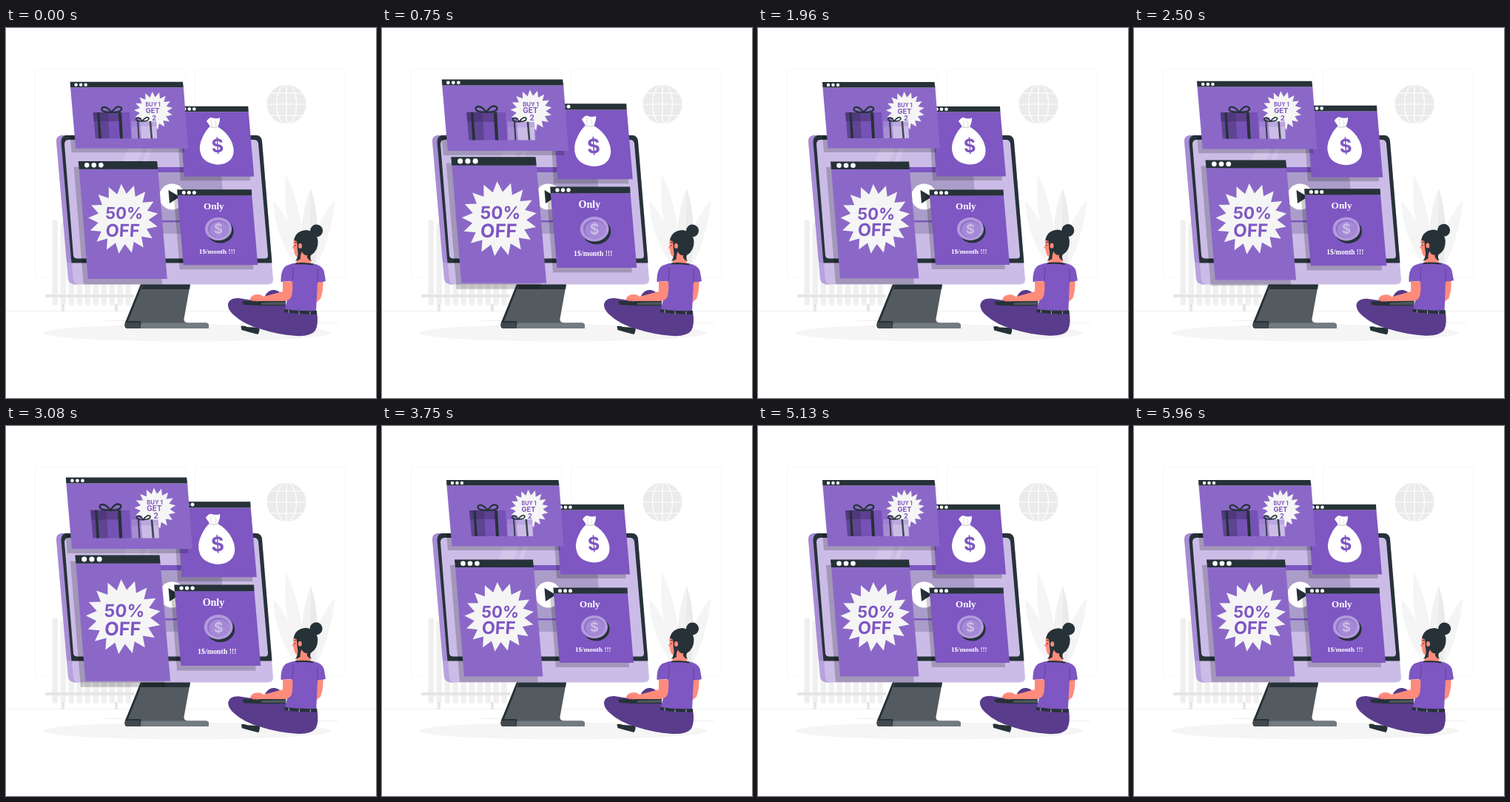
An HTML page that plays this animation: 500 px wide and 500 px high, repeating every 6000 ms.

```html
<!DOCTYPE html>
<html lang="en">
<head>
<meta charset="utf-8">
<title>Offers on screen</title>
<style>
  html, body { margin: 0; width: 100%; height: 100%; overflow: hidden; background: #fff; }
  svg { display: block; width: 100vw; height: 100vh; }
  text { text-anchor: middle; font-weight: 700; font-family: Inter, Roboto, sans-serif; }
  .serif text { font-family: "Liberation Serif", "Noto Serif", serif; }
  .serif .coin { font-family: Inter, Roboto, sans-serif; }
  .dark { fill: #263238; }
  .main { fill: #7e57c2; }
  .soft { fill: #8b68c8; }
  .pale { fill: #cbbce7; }
  .skin { fill: #ff8b7b; }
  .shade { fill: #000; opacity: .2; }
  .line { fill: none; stroke: #263238; stroke-width: 2.2; }
  .thin { stroke-width: 1.6; }
  #top { transform-origin: 166.5px 118px; }
  #bag { transform-origin: 286px 153px; }
  #sale { transform-origin: 158px 259px; }
  #coin { transform-origin: 285.5px 269px; }
  #woman { transform-origin: 366px 340px; }
</style>
</head>
<body>
<svg viewBox="0 0 500 500">
  <!-- Room -->
  <g fill="none" stroke="#f8f8f8">
    <path d="M39.500 55.500H242.500V337.500H39.500ZM255.500 55.500H458.500V337.500H255.500Z"/>
    <path d="M0 382.500H500M134 395.500H168M380 398.500H449" stroke="#f0f0f0"/>
  </g>
  <circle cx="379" cy="103" r="26.500" fill="#ebebeb"/>
  <g fill="none" stroke="#fff" stroke-width="1.200">
    <ellipse cx="379" cy="103" rx="13.500" ry="26.500"/>
    <path d="M379 76V130M352 103H406M357 88H401M357 118H401"/>
  </g>
  <g fill="#f5f5f5">
    <path d="M399 318Q372 262 378 198Q399 235 405 318Z"/>
    <path d="M397 318Q386 258 361 234Q364 285 392 320Z"/>
    <path d="M412 318Q414 266 445 232Q437 290 420 320Z"/>
    <path d="M400 318Q396 255 412 217Q426 258 418 318Z" fill="#ebebeb"/>
    <path d="M400 318Q396 255 412 217Q412 265 408 318Z" fill="#f2f2f2"/>
  </g>
  <g fill="#f0f0f0">
    <g id="fins"></g>
    <path d="M53 360H173V364H53ZM75 373H79V383H75ZM147 373H151V383H147Z" fill="#e6e6e6"/>
  </g>
  <ellipse cx="245" cy="412" rx="194" ry="11.500" fill="#f5f5f5"/>

  <!-- Monitor -->
  <path d="M185 346H249L240.500 393Q240 398 246 398.500H271Q274 399 274 402V406H164Q159 405 161 398Z" fill="#535b60"/>
  <path d="M185 346H249L248 353H183ZM185 346L165 396H182V406H164Q159 405 161 398L182 346Z" class="dark"/>
  <path d="M185 398.500H270Q274 399 274 402V406H182V400Z" fill="#727b7f"/>
  <path d="M161 398H180L182 406H164Q160 405 161 398Z" fill="#40494e"/>
  <path d="M75 145H338Q345 145 346 153L361 340Q361 346.500 354 346.500H93Q85 346 84 339L68 153Q68 146 75 145Z" class="pale"/>
  <path d="M75 145H82L89 317H82L68 153Q68 146 75 145Z" fill="#a78cd5"/>
  <path d="M82 317H89L91 340Q92 346 97 346.500H93Q85 346 84 339Z" fill="#b7a2df"/>
  <path d="M81 145H338Q345 145 346 153L359.500 317.500H88.500L74.500 154Q74.500 146 81 145Z" class="dark"/>
  <path d="M85 151H335Q340 151 341 156L354 307Q354 311.500 350 311.500H96Q91 311 91 307L79 157Q79 151 85 151Z" class="pale"/>
  <path d="M170 151H190L175 187H155ZM196 151H202L188 187H182Z" fill="#fff" opacity=".15"/>
  <path d="M120 188H290L298 278H128Z" fill="#ab9dc9"/>
  <path d="M120 188H240V195H121ZM126 260H290V262.500H126Z" class="main"/>
  <circle cx="224.500" cy="228" r="17.500" fill="#fff"/>
  <path d="M219.500 219L235 228L221 237Z" class="dark"/>

  <g id="bag" class="pop">
    <path d="M231 120H323L330 206H236Z" class="shade"/>
    <path d="M234.500 113.500H327.500L335 200.500H241Z" class="main"/>
    <path d="M234 106H327L327.500 113.500H234.500Z" class="dark"/>
    <g fill="#fff">
      <circle cx="241.500" cy="109.700" r="2.300"/><circle cx="248" cy="109.700" r="2.300"/><circle cx="254.500" cy="109.700" r="2.300"/>
      <path d="M271 126Q276 119 280 122Q285 123 289 121.500Q289 129 286 133.500Q298 140 304 152Q311 167 304 177Q298 184.500 286 184.500Q269 183 264 172Q259 160 266 147Q270 138 276 133Z"/>
    </g>
    <path d="M275 133Q281 136 287 133" fill="none" stroke="#d8d8d8" stroke-width="1.500"/>
    <path d="M278 124Q276 128 279 132M282 125Q285 128 283 132" fill="none" stroke="#ddd"/>
    <text x="286" y="168" font-size="25" class="main" transform="rotate(-4 286 160)">$</text>
  </g>

  <g id="top" class="pop">
    <path d="M87 145H236L241 168H89Z" class="shade"/>
    <path d="M87.500 80.500H239.500L245.700 162.500H94.500Z" class="soft"/>
    <path d="M87 73H238.500L239.500 80.500H87.500Z" class="dark"/>
    <g fill="#fff">
      <circle cx="95" cy="77" r="2.200"/><circle cx="101.500" cy="77" r="2.200"/><circle cx="108" cy="77" r="2.200"/>
    </g>
    <path data-star="199 112 26 18.500 17" fill="#f5f5f5"/>
    <g class="main">
      <text x="198.500" y="106.500" font-size="7.200">BUY 1</text>
      <text x="198" y="115.500" font-size="9.300">GET</text>
      <text x="200" y="124.500" font-size="9.300">2</text>
    </g>
    <path d="M118 114H139L141 149H121Z" fill="#5f4494"/>
    <path d="M138 114H167L169 149H140Z" fill="#7652b6"/>
    <path d="M118 114H156L157 126H119Z" fill="#382657" opacity=".4"/>
    <path d="M123.500 114H126.500L129 149H125.500ZM152 114H156L158 149H154Z" class="dark"/>
    <path d="M143 114Q127 114 130 108Q135 104 143 114Q150 103 156 108Q158 114 143 114" class="line"/>
    <path d="M169 126H182L183 149H170Z" fill="#a88dd6"/>
    <path d="M181 126H203L204 149H183Z" class="pale"/>
    <path d="M168 126H203L204 133H169Z" fill="#7e57c2" opacity=".2"/>
    <path d="M177 126H179L180.500 149H178.500ZM193.500 126H196L198 149H195.500Z" class="dark" opacity=".85"/>
    <path d="M184 126Q174 126 176 122Q180 119 184 126Q190 118 193 122Q193 126 184 126" class="line thin"/>
  </g>

  <g id="sale" class="pop">
    <path d="M92 188H198L211 346H105Z" class="shade"/>
    <path d="M99 191H205L217.500 338.500H111Z" class="soft"/>
    <path d="M98 180.500H204L205 191H99Z" class="dark"/>
    <g fill="#fff">
      <circle cx="109.500" cy="185.700" r="3.300"/><circle cx="119" cy="185.700" r="3.300"/><circle cx="128.500" cy="185.700" r="3.300"/>
    </g>
    <path data-star="158.500 258 47 34 17" fill="#f5f5f5"/>
    <g class="main" transform="translate(159.500 258.500) skewX(-3)">
      <text font-size="22">50%</text>
      <text x="-1" y="23" font-size="23.500">OFF</text>
    </g>
  </g>

  <g id="coin" class="pop serif">
    <path d="M227 226H326L334 326H235Z" class="shade"/>
    <path d="M232 226.500H332L340 320H240Z" class="main"/>
    <path d="M231.500 218.500H331.500L332 226.500H232Z" class="dark"/>
    <g fill="#fff">
      <circle cx="240.500" cy="222.700" r="2.500"/><circle cx="247.500" cy="222.700" r="2.500"/><circle cx="254.500" cy="222.700" r="2.500"/>
      <text x="280.800" y="245" font-size="13">Only</text>
      <text x="285.300" y="305" font-size="9.200">1$/month !!!</text>
    </g>
    <ellipse cx="289.500" cy="274.500" rx="18" ry="16" class="dark"/>
    <ellipse cx="287" cy="271.500" rx="18" ry="15.500" fill="#b29add"/>
    <ellipse cx="287" cy="271.500" rx="14" ry="12" fill="#8f6fca"/>
    <ellipse cx="288" cy="272.500" rx="13" ry="11" fill="#a589d6"/>
    <text x="287" y="278" font-size="18" class="pale coin">$</text>
  </g>

  <g id="woman">
    <path d="M350 362Q355 353 363 354Q370 355 377 364L376 372H350Z" fill="#55398a"/>
    <path d="M317.500 403Q321 402 326 404L342.500 405Q343 411 340.500 414Q328 411 318.500 408Z" class="dark"/>
    <path d="M300 374Q301 365 314 365L378 375L420 383Q423 400 418 409Q412 417 392 416Q366 414 345 407Q322 401 308 388Q300 381 300 374Z" fill="#593c8b"/>
    <path d="M319 369L378 368V375Q346 376 321 374Z" class="dark"/>
    <path d="M345 371L378 370V374H345Z" fill="#4c565b"/>
    <path d="M420 340L428.500 342Q429 355 425 366L419 371Z" class="skin"/>
    <path d="M395 302H411L412 320H392Z" class="skin"/>
    <path d="M390 284Q387 290 389 293L386.800 297L389 299Q389 307 394 310L404 307L410 288L400 280Z" class="skin"/>
    <path d="M388 318H413Q428 320 430 330L432 342Q427 344 421 343L419 384Q396 385 377 380L386 342L371.500 343Q371 326 379 321Z" class="main"/>
    <path d="M388 323Q389 335 385 345M421 326L421 344" fill="none" stroke="#62419d"/>
    <path d="M391 317.500Q403 316 415 318.500V320.500Q403 318.500 391 319.500Z" class="dark"/>
    <path d="M376 380Q398 383 420 382V387Q396 387 376 384Z" class="dark"/>
    <path d="M382 381V385M396 382.500V387M411 383V387" stroke="#b9a5dd" fill="none"/>
    <path d="M374 342.500H387Q388 354 386 362Q384 369 375 369H345Q334 372 330 366Q332 360 341 360Q345 360 348 363L374 356Z" class="skin"/>
    <path d="M330 367L336 366M333 369L340 367" stroke="#e57668" fill="none"/>
    <path d="M324 370H345" stroke="#263238" stroke-width="2" stroke-dasharray="3 1" fill="none"/>
    <circle cx="419.500" cy="274" r="8.500" class="dark"/>
    <path d="M389 287Q391 274 406 273Q420 275 421.500 288Q422 301 412 307Q410 311 413 315Q406 313 407 307Q402 308 400 302Q397 308 398 312Q395 314 391 315Q396 309 394 300L393 288Z" class="dark"/>
    <ellipse cx="397.500" cy="294.500" rx="2.500" ry="3.500" class="skin"/>
    <path d="M390 290L393 289M390.500 293V295" stroke="#263238" fill="none"/>
  </g>
</svg>
<script>
const LOOP = 6000;
const all = query => [...document.querySelectorAll(query)];

for (const el of all('[data-star]')) {
  const [x, y, outer, inner, points] = el.dataset.star.split(' ').map(Number);
  const corners = Array.from({ length: points * 2 }, (_, i) => {
    const a = Math.PI * i / points - 1.63, r = i % 2 ? inner : outer;
    return `${x + r * Math.cos(a)},${y + r * Math.sin(a)}`;
  });
  el.setAttribute('d', `M${corners.join('L')}Z`);
}

document.getElementById('fins').innerHTML = Array.from({ length: 10 }, (_, i) =>
  `<rect x="${62.5 + i * 11}" y="${i ? 263 : 259}" width="7.5" height="${i ? 112 : 116}" rx="3.5"/>`).join('');

// Each key is [time, value].
const pulse = [[0, 1.005], [470, 1.1], [1795, 1], [2370, 1], [2890, 1.1], [3740, 1], [LOOP, 1]];
const sway = [[0, .1], [1200, 0], [2400, -.8], [3600, 0], [4900, .25], [LOOP, .1]];
const linear = p => p;
const smooth = p => p * p * (3 - 2 * p);

function valueAt(keys, t, ease) {
  const i = keys.findIndex(key => key[0] > t);
  const [t0, a] = keys[i - 1], [t1, b] = keys[i];
  return a + (b - a) * ease((t - t0) / (t1 - t0));
}

const windows = all('.pop');
const woman = document.getElementById('woman');

function draw() {
  const t = performance.now() % LOOP;
  const scale = valueAt(pulse, t, linear);
  for (const el of windows) el.style.transform = `scale(${scale})`;
  woman.style.transform = `rotate(${valueAt(sway, t, smooth)}deg)`;
  requestAnimationFrame(draw);
}
draw();
</script>
</body>
</html>
```
